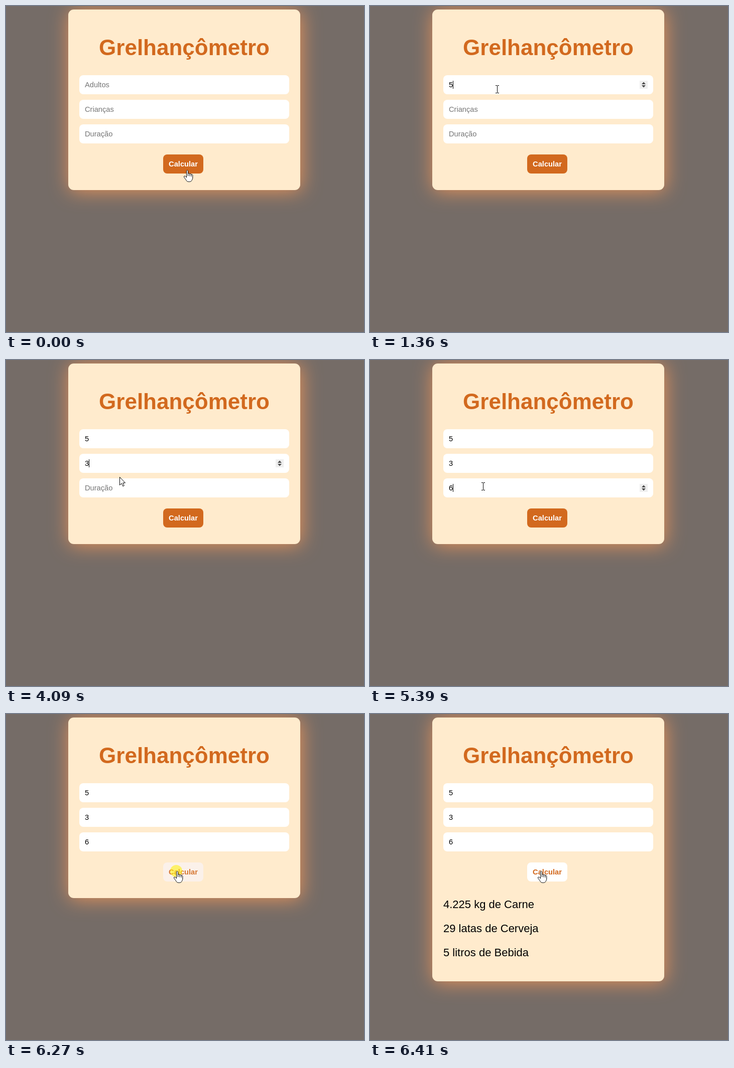
An HTML page that plays this animation: 713 px wide and 650 px high, repeating every 8 s.

```html
<!DOCTYPE html>
<html lang="pt-BR">
<head>
<meta charset="utf-8">
<title>Calculadora</title>
<style>
  html, body { margin: 0; width: 100%; height: 100%; overflow: hidden; background: #756c67; }
  body { position: relative; font: 22px "Liberation Sans", Arial, sans-serif; }
  div, h1, p, svg { position: absolute; margin: 0; white-space: nowrap; }
  #card { left: 124px; top: 7px; width: 462px; border-radius: 11px; background: #ffebcd;
          box-shadow: 2px 2px 38px #e8935a; }
  h1 { left: 0; top: 51px; width: 462px; font-size: 44px; line-height: 50px; text-align: center; color: #d2691e; }
  .field { left: 22px; width: 407px; height: 38px; padding-left: 11px; border-radius: 8px;
           background: #fff; font-size: 14.667px; line-height: 38px; }
  .spin { left: 391px; top: 11px; width: 16px; height: 16px; background: #efefef; }
  .caret { top: 11px; width: 1px; height: 16px; background: #000; }
  #button { left: 189px; top: 289px; width: 80px; height: 38px; border-radius: 8px;
            font-size: 14.667px; font-weight: bold; line-height: 38px; text-align: center; }
  p { left: 22px; line-height: 26px; color: #000; }
  #overlay { left: 0; top: 0; }
  #overlay path { fill: none; stroke: #000; stroke-linejoin: round; }
  #overlay .solid { fill: #fff; }
</style>
</head>
<body>
<div id="card">
  <h1>Grelhançômetro</h1>
  <div id="button">Calcular</div>
  <div id="results">
    <p style="top:360px">4.225 kg de Carne</p>
    <p style="top:408px">29 latas de Cerveja</p>
    <p style="top:456px">5 litros de Bebida</p>
  </div>
</div>
<svg id="overlay" width="713" height="650">
  <circle id="click" r="12" fill="#fff000" fill-opacity=".55"/>
  <g id="arrow"><path class="solid" d="M.5.5V16.5L4.2 13L6.8 18.7L9.3 17.6L6.8 12H11.5Z"/></g>
  <g id="beam"><path d="M-3-7.5H0M1-7.5H4M.5-7V7M-3 7.5H0M1 7.5H4"/></g>
  <g id="hand"><path class="solid" d="M-1.5 12V1C-1.5-1 1.5-1 1.5 1V6.5C2 5 4.8 5.2 4.8 7.2C5.5 6 8 6.2 8 8.2C9 7.2 10.8 7.8 10.8 9.5V15C10.8 17 9 19.5 8.5 20.5C7.5 23 0 23-1.5 20.5C-2.5 18-5 15.5-6.5 13C-7.2 11.5-5 10.3-3.8 11.5L-1.5 14V11"/><path d="M1.5 6V11M4.8 7V11.5M8 8V12"/></g>
</svg>
<script>
const LOOP = 8000;
const $ = id => document.getElementById(id);
const show = (el, on) => { el.style.display = on ? '' : 'none'; };
const within = (t, spans) => spans.some(([a, b]) => t >= a && t < b);
const mix = (a, b, k) => a + (b - a) * k;

const fields = [
  { hint: 'Adultos', value: '5', typed: 1270, focus: [690, 2450] },
  { hint: 'Crianças', value: '3', typed: 3780, focus: [2450, 4240] },
  { hint: 'Duração', value: '6', typed: 5390, focus: [4240, 6250] }
];
const caretOn = [[690, 1190], [1270, 1740], [2220, 2910], [3460, 4930], [5390, 6250]];
const clicks = [[690, 960], [2450, 2680], [4240, 4400], [6250, 6400]];

// Pointer moves: first step, last step, step count, destination
const START = [361, 328];
const moves = [
  [70, 240, 4, 268, 192],
  [390, 690, 5, 256, 166],
  [1190, 1360, 3, 253, 166],
  [2220, 2450, 4, 241, 194],
  [2680, 2680, 1, 241, 197],
  [2750, 2830, 2, 233, 206],
  [3930, 4090, 3, 226, 233],
  [4160, 4240, 2, 225, 252],
  [5620, 6170, 8, 341, 314]
];

fields.forEach((f, i) => {
  f.top = 138 + 49 * i;
  const el = document.createElement('div');
  el.className = 'field';
  el.style.top = f.top - 7 + 'px';
  el.innerHTML = '<span></span><div class="caret"></div>' +
    '<svg class="spin" viewBox="0 0 16 16"><path fill="#4a4a4a" d="M4 7L8 2.5L12 7ZM4 9L8 13.5L12 9Z"/></svg>';
  [f.text, f.caret, f.spin] = el.children;
  $('card').append(el);
});

function pointerAt(t) {
  let [x, y] = START;
  for (const [from, to, steps, toX, toY] of moves) {
    if (t < from) break;
    const step = t >= to ? steps : 1 + Math.floor((t - from) / (to - from) * (steps - 1));
    x = Math.round(mix(x, toX, step / steps));
    y = Math.round(mix(y, toY, step / steps));
  }
  return [x, y];
}

function render(t) {
  const [x, y] = pointerAt(t);
  const overButton = x >= 313 && x < 393 && y >= 296 && y < 334;
  let overField = false;

  for (const f of fields) {
    const hover = x >= 146 && x < 564 && y >= f.top && y < f.top + 38;
    const focused = within(t, [f.focus]);
    const filled = t >= f.typed;
    overField ||= hover;
    f.text.textContent = filled ? f.value : f.hint;
    f.text.style.color = filled ? '#000' : '#757575';
    f.caret.style.left = filled ? '19px' : '11px';
    show(f.caret, focused && within(t, caretOn));
    show(f.spin, focused || hover);
  }

  const kind = overButton ? 'hand' : overField ? 'beam' : 'arrow';
  for (const id of ['hand', 'beam', 'arrow']) {
    show($(id), id === kind);
    $(id).setAttribute('transform', `translate(${x} ${y})`);
  }
  $('click').setAttribute('transform', `translate(${x - 2} ${y - 1})`);
  show($('click'), within(t, clicks));

  const glow = Math.min(1, Math.max(0, (t - 6090) / 200));
  const blend = (a, b) => `rgb(${a.map((v, i) => Math.round(mix(v, b[i], glow)))})`;
  const orange = [210, 105, 30], white = [255, 255, 255];
  $('button').style.background = blend(orange, white);
  $('button').style.color = blend(white, orange);

  const done = t >= 6350;
  show($('results'), done);
  $('card').style.height = (done ? 526 : 360) + 'px';
}

const begin = performance.now();
function tick() {
  render((performance.now() - begin) % LOOP);
  requestAnimationFrame(tick);
}
tick();
</script>
</body>
</html>
```
